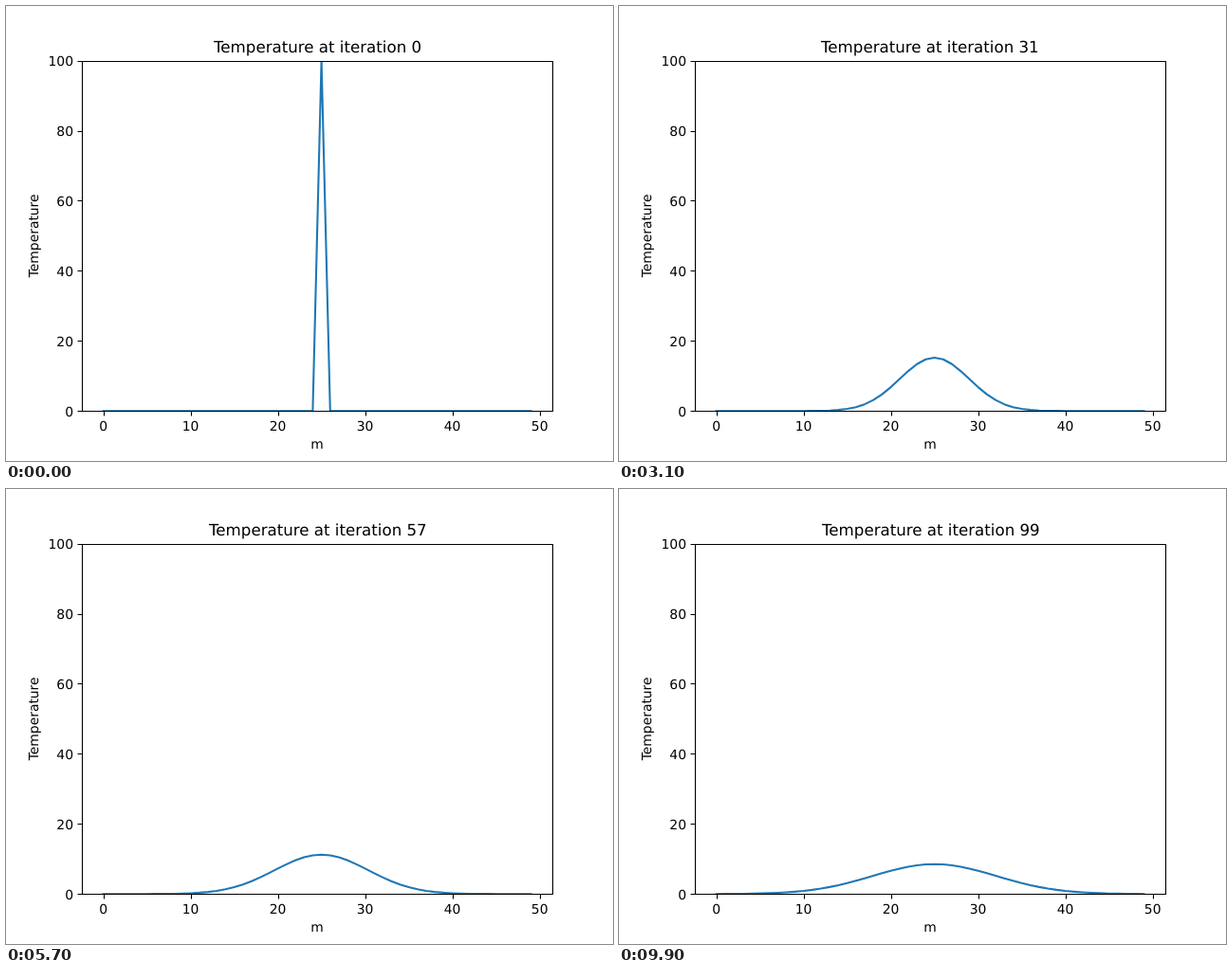
An HTML page that plays this animation: 640x480 px, repeating every 10 s.

```html
<!DOCTYPE html>
<html lang="en">
<head>
<meta charset="utf-8">
<title>Temperature diffusion</title>
<style>
  html, body { margin: 0; width: 100%; height: 100%; overflow: hidden; background: #fff; }
  svg { display: block; width: 640px; height: 480px; }
  text { font: 13.889px "DejaVu Sans", sans-serif; fill: #000; text-rendering: geometricPrecision; white-space: pre; }
  #title { font-size: 16.667px; }
  .mid { text-anchor: middle; }
  .end { text-anchor: end; }
  #axes { fill: none; stroke: #000; stroke-width: 1.111; stroke-linecap: square; }
  #ticks { fill: none; stroke: #000; stroke-width: 1.111; }
  #curve { fill: none; stroke: #1f77b4; stroke-width: 2.083; stroke-linejoin: round; stroke-linecap: square; }
</style>
</head>
<body>
<svg viewBox="0 0 640 480">
  <clipPath id="plot"><rect x="80" y="58" width="496" height="369"/></clipPath>
  <g clip-path="url(#plot)"><path id="curve"/></g>
  <path id="ticks"/>
  <path id="axes" d="M80.5 58.5H576.5V427.5H80.5Z"/>
  <g id="labels"></g>
  <text class="mid" x="328" y="467">m</text>
  <text class="mid" transform="translate(34 242.4) rotate(-90)">Temperature</text>
  <text id="title" y="49"></text>
</svg>
<script>
  const CELLS = 50, HOT = 25, STEPS = 100, STEP_MS = 100, RATE = 0.25;
  const get = id => document.getElementById(id);
  const px = m => 80 + (m + 2.45) * 496 / 53.9;
  const py = temp => 427.2 - temp * 3.696;

  function addLabel(value, x, y, cls) {
    const el = document.createElementNS("http://www.w3.org/2000/svg", "text");
    el.setAttribute("x", x);
    el.setAttribute("y", y);
    el.setAttribute("class", cls);
    el.textContent = value;
    get("labels").append(el);
  }

  let ticks = "";
  for (let i = 0; i <= 5; i++) {
    const x = px(i * 10), y = py(i * 20);
    ticks += `M${Math.round(x) + 0.5} 427.5v5M80.5 ${Math.round(y) + 0.5}h-5`;
    addLabel(i * 10, x, 448, "mid");
    addLabel(i * 20, 71, Math.round(y + 5.4), "end");
  }
  get("ticks").setAttribute("d", ticks);

  // Explicit heat equation with cold ends; the hot cell is held for the first step.
  const rows = [Array.from({ length: CELLS }, (_, m) => m === HOT ? 100 : 0)];
  for (let n = 1; n < STEPS; n++) {
    const u = rows[n - 1];
    const next = u.map((v, m) =>
      m === 0 || m === CELLS - 1 ? 0 : v + RATE * (u[m - 1] - 2 * v + u[m + 1]));
    if (n === 1) next[HOT] = 100;
    rows.push(next);
  }

  const titleX = n => n < 10 ? 219 : n < 40 ? 213 : 214;
  let shown = -1;

  function draw() {
    const n = Math.floor(performance.now() / STEP_MS) % STEPS;
    if (n !== shown) {
      shown = n;
      const points = rows[n].map((v, m) => `${px(m).toFixed(2)} ${py(v).toFixed(2)}`);
      get("curve").setAttribute("d", "M" + points.join("L"));
      get("title").setAttribute("x", titleX(n));
      get("title").textContent = `Temperature at iteration ${n}`;
    }
    requestAnimationFrame(draw);
  }
  draw();
</script>
</body>
</html>
```
